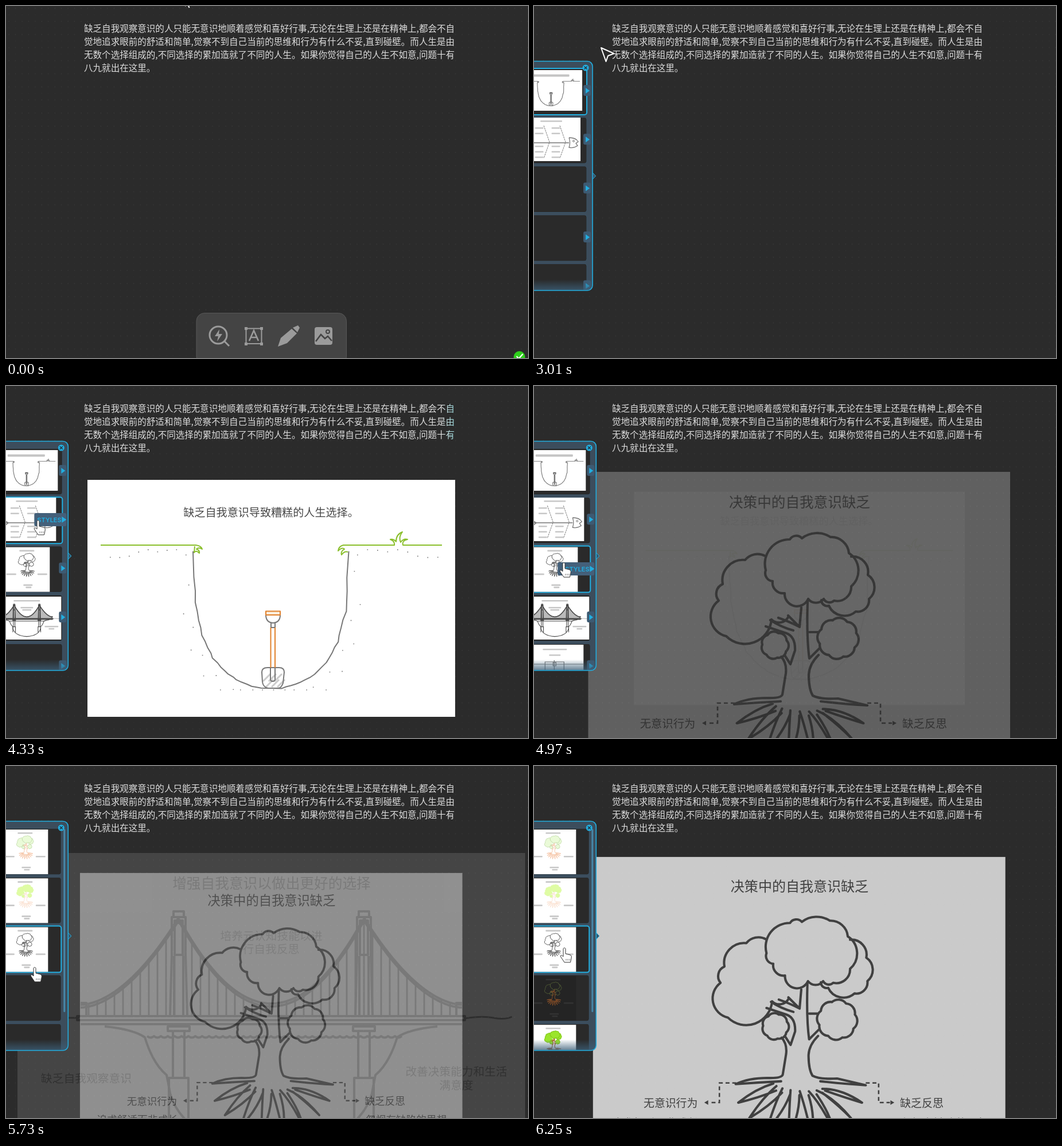
An HTML page for the animation above (6290 ms loop, 910x615 px).

```html
<!DOCTYPE html>
<html lang="zh">
<head>
<meta charset="utf-8">
<style>
html, body { margin: 0; width: 100%; height: 100%; overflow: hidden; background: #2b2b2b; }
svg { display: block; width: 100%; height: 100%; }
text { font-family: "Noto Sans CJK SC", "Noto Sans CJK", "Noto Sans", sans-serif; }
</style>
</head>
<body>
<svg id="stage" viewBox="0 0 910 615" fill="none"></svg>
<script>
const LOOP = 6290, INK = '#484848', BLUE = '#22aee0', SLATE = '#3d566a';
const stage = document.getElementById('stage');

// --- helpers ---
const range = (n, f) => Array.from({ length: n }, (_, i) => f(i));
const many = (n, f) => range(n, f).join('');
const rect = (x, y, w, h, fill, more = '') =>
  `<rect x="${x}" y="${y}" width="${w}" height="${h}" fill="${fill}" ${more}/>`;
const path = (d, more = '') => `<path d="${d}" ${more}/>`;
const label = (s, x, y, size, fill = INK, more = '') =>
  `<text x="${x}" y="${y}" font-size="${size}" fill="${fill}" text-anchor="middle" ${more}>${s}</text>`;
const group = (id, body, more = '') => `<g id="${id}" ${more}>${body}</g>`;
const place = (x, y, s, body) => `<g transform="translate(${x} ${y}) scale(${s})">${body}</g>`;
const bar = (cx, y, w, fill = '#c8c8c8', h = 2.6) => rect(cx - w / 2, y, w, h, fill, 'rx="1"');
const poly = pts => 'M' + pts.map(p => p.join(' ')).join('L');
const clamp = p => Math.min(1, Math.max(0, p));
const smooth = p => (p = clamp(p)) * p * (3 - 2 * p);
const easeOut = p => 1 - Math.pow(1 - clamp(p), 3);
function seeded(seed) {
  return () => (seed = seed * 16807 % 2147483647) / 2147483647;
}

// Scalloped outline through clockwise points; the third value is how far a lobe bulges
function cloud(pts, closed) {
  const all = closed ? [...pts, pts[0]] : pts;
  return all.map(([x, y, bulge = 0.25], i) => {
    if (!i) return `M${x} ${y}`;
    const r = Math.hypot(x - all[i - 1][0], y - all[i - 1][1]) * (bulge / 2 + 1 / (8 * bulge));
    return `A${r} ${r} 0 0 1 ${x} ${y}`;
  }).join('');
}
const blob = (cx, cy, r, n) => cloud(range(n, i => {
  const a = i / n * 2 * Math.PI + 0.5;
  return [cx + r * Math.cos(a), cy + r * Math.sin(a), 0.22];
}), true);

// --- pit ---
const pitPoint = (a, grow = 1) =>
  [462 - 134 * grow * Math.cos(a), 288 + 241 * grow * Math.pow(Math.sin(a), 0.606)];
function pitArt(w, green = '#8abf2c', orange = '#e0812c', ink = '#777') {
  const rnd = seeded(7);
  const wall = range(49, i => {
    const [x, y] = pitPoint(Math.PI * i / 48);
    return [x + rnd() * 4 - 2, y + rnd() * 2 - 1];
  });
  const dot = ([x, y]) => `M${x} ${y}h1.6`;
  const specks = many(25, i => dot(pitPoint(Math.PI * Math.pow((i + 0.7) / 25, 1), i % 2 ? 1.17 : 1.08).map((v, k) => k ? Math.min(v, 531) : v))) +
    many(9, i => {
      const y = 286 + rnd() * 15;
      return dot([181 + i * 16.5, y]) + dot([752 - i * 17.5, y]);
    });
  return `<g stroke-width="${w}" stroke-linejoin="round" stroke="${ink}">` +
    path(poly(wall)) + path(specks, 'stroke-width="1.6"') +
    path('M165 278H331Q340 279 342 285Q336 281 332 285Q338 287 337 292Q331 286 328 291L329 280' +
      'M760 278H692Q690 270 700 268Q693 266 688 273Q684 264 691 255Q680 259 680 272Q676 267 670 268Q678 271 677 278H588Q580 280 579 288Q586 281 590 285Q583 289 585 295Q590 288 596 290',
      `stroke="${green}"`) +
    path('M453 400Q453 413 465.5 414Q478 413 478 400M462 414V422H469V414M456 492H476Q485 492 485 500L483 519Q480 528 474 528H457Q448 526 447 517L446 500Q446 492 456 492M461 492V512Q461 516 465 516Q469 516 469 512V492') +
    path('M453 393.5H478V400H453ZM461.5 422V492M469 422V492', `stroke="${orange}" fill="#fbeedd"`) + '</g>';
}

// --- tree ---
const leftCrown = cloud([[443, 404], [414, 408], [335, 437, 0.32], [322, 375, 0.32], [329, 346], [368, 304], [403, 297, 0.18]]);
const rightCrown = cloud([[553, 298], [582, 330], [584, 372], [561, 394], [514, 384], [501, 374]]);
const midCrown = cloud([[404, 322], [446, 268], [467, 266], [517, 264, 0.16], [549, 292, 0.2], [553, 350], [523, 375],
  [505, 372], [478, 372], [437, 362, 0.42], [416, 341]], true);
const trunk = 'M477 376Q475 440 480 476L497 459M480 430H495M466 387L463 421L443 401M426 405Q446 412 463 421' +
  'M412 409Q430 421 452 427M404 420L440 432Q456 438 455 462L447 486L438 472' +
  'M431 473Q441 484 439 502L433 539Q431 546 405 545Q372 545 349 556Q390 553 430 551' +
  'M496 470Q480 486 479 504Q479 530 486 541Q500 548 530 546L581 558Q545 556 500 551';
// Tapered roots fanned below the trunk
const roots = many(8, i => {
  const a = Math.PI * (0.1 + 0.8 * i / 7), c = Math.cos(a), s = Math.sin(a);
  const bx = 462 + 46 * c, by = 556 + 12 * s, tx = 464 + 116 * c, ty = 562 + 88 * s;
  const mx = (bx + tx) / 2, my = (by + ty) / 2;
  return `M${bx - 7 * s} ${by + 5 * c}Q${mx - 4 * s} ${my - 10} ${tx} ${ty}Q${mx + 14 * s} ${my + 6} ${bx + 9 * s} ${by + 8}`;
});
function treeArt(w, leaf = INK, wood = INK, fill = 'none') {
  const leaves = [leftCrown, rightCrown, midCrown, blob(420, 453, 22, 7), blob(530, 441, 33, 8)];
  return `<g stroke-width="${w}" stroke-linejoin="round" stroke-linecap="round">` +
    path(trunk + roots, `stroke="${wood}"`) +
    `<g stroke="${leaf}">${leaves.map(d => path(d, `fill="${fill}"`)).join('')}</g></g>`;
}

// --- bridge ---
function cableY(x) {
  const d = Math.abs(x - 462.5);
  return d > 161.5 ? 417 - 152 * Math.pow((332.5 - d) / 171, 1.8) : 415 - 150 * Math.pow(d / 161.5, 2);
}
function bridgeArt(w) {
  const cable = range(134, i => [130 + i * 5, cableY(130 + i * 5)]);
  const hangers = many(43, i => `M${144 + i * 15} ${cableY(144 + i * 15)}V437`);
  const side = (x, k) => `M${x} 254H${x + 9 * k}V264H${x + 12 * k}V330L${x + 15 * k} 437M${x} 270H${x + 7 * k}V330H${x}M${x} 264H${x + 12 * k}` +
    `M${x + 8 * k} 332V437M${x} 455H${x + 19 * k}V463H${x}M${x + 10 * k} 463V545M${x} 545H${x + 17 * k}V616`;
  const bank = (cx, k) => {
    const p = (x, y) => `${cx - k * x} ${y} `;
    return `M${p(290, 455)}Q${p(240, 460)}${p(220, 474)}Q${p(206, 520)}${p(182, 540)}Q${p(178, 560)}${p(176, 572)}Q${p(150, 660)}${p(0, 670)}`;
  };
  return `<g stroke="${INK}" stroke-linejoin="round" stroke-width="${w}">` +
    path(poly(cable)) + path(poly(cable.map(([x, y]) => [x, y + 5]))) + path(hangers, `stroke-width="${w * 0.7}"`) +
    [301, 624].map(x => path(side(x, 1) + side(x, -1))).join('') +
    path('M124 437H800V444H124ZM130 451H795M130 414H140V437M795 414H785V437') +
    path('M246 472' + 'q6 5 12 0'.repeat(37) + bank(462, 1) + bank(462, -1)) +
    path('M105 440H128M800 441Q830 436 850 440T882 438', 'stroke-width="3"') + '</g>';
}

// --- sheets ---
const PEN = 'font-weight="500"';
const hatch = many(6, i => `M${448 + i * 5} ${516 + i % 2 * 10}l13 -13`);
const pit = rect(142, 164, 641, 414, '#fff') + label('缺乏自我意识导致糟糕的人生选择。', 462, 228, 19.1) +
  group('hatch', path(hatch, 'stroke="#ccc" stroke-width="3"')) + pitArt(2);
const tree = rect(94.5, 150, 735.5, 790, '#fff') +
  label('决策中的自我意识缺乏', 463, 212, 24.6, INK, PEN) + treeArt(4.2) +
  path('M350 554H320V589H302M581 554H604V589H624', `stroke="${INK}" stroke-width="2.6" stroke-dasharray="7 5"`) +
  path('M293 589l7-4v8zM632 589l-7-4v8z', `fill="${INK}"`) +
  label('无意识行为', 233, 597, 19.3, INK, PEN) + label('缺乏反思', 681, 597, 19.5, INK, PEN) +
  label('追求舒适而非成长', 205, 633, 19.5) + label('忽视有缺陷的思想', 722, 633, 19.5);
const bridge = rect(20, 152, 885, 560, '#fff') + label('增强自我意识以做出更好的选择', 463, 214, 24.7, '#555', PEN) +
  label('培养元认知技能以进', 462.5, 304, 19.8, '#777') + label('行自我反思', 462, 327, 19.8, '#777') +
  label('缺乏自我观察意识', 140, 553, 19.8, '#555') + label('改善决策能力和生活', 785, 541, 19.7, '#555') +
  label('满意度', 785, 565, 19.7, '#555') + bridgeArt(4);

// --- side panel ---
const slotTop = i => 109 + i * 85.3;
const slots = w => many(5, i => rect(-8, slotTop(i), w + 8, 81, '#2a2a2a', `id="${w}s${i}" rx="4" stroke="${SLATE}"`));
const tabs = many(5, i => rect(93, slotTop(i) + 29, 13, 19, '#3d5a72', 'rx="3"') + path(`M97 ${slotTop(i) + 34}l7 5l-7 5z`, `fill="${BLUE}"`));
function treeThumb(i, w, art, paper = '#fff', ink = '#c8c8c8') {
  const y = slotTop(i), cx = w - 40;
  return rect(0, y + 2, w, 78, paper) + place(cx - 47, y - 14, 0.104, art) + bar(cx, y + 7, 26, ink) +
    [-1, 1].map(k => bar(cx + 27 * k, y + 48, 17, ink)).join('') + bar(cx + 2, y + 67, 16, ink) + bar(cx + 3, y + 71, 10, ink);
}
const fishThumb = rect(0, 195, 88, 76, '#fff') +
  path('M0 239H68M0 236L5 239L0 243M68 230Q80 230 84 237L80 240L83 244Q76 249 68 247Q71 239 68 230', 'stroke="#777" stroke-width="1.3"') +
  '<circle cx="76" cy="236" r="1.5" stroke="#777"/>' + bar(37, 200, 38) +
  many(2, i => path(`M${24 + i * 28} 209l10 29l-10 28`, 'stroke="#777" stroke-dasharray="3 1"') +
    many(5, j => bar(16 + i * 29, 212 + j * 9.5 + (j > 1 ? 13 : 0), 15)));
const cardThumb = rect(0, 452, 87, 60, '#fff') + bar(37, 459, 42) + bar(37, 469, 20) +
  path('M0 486H87M20 497V482H53V497M36 479V500M34 483H39V489H34Z', 'stroke="#777" stroke-width="1.2"');
const ideas = slots(99) +
  rect(0, 112, 91, 71, '#fff') + place(-43, 84, 0.171, pitArt(6.5, '#888', '#666', '#777')) + bar(36, 119.5, 65, '#c4c4c4', 4) +
  fishThumb +
  group('late', treeThumb(2, 77, treeArt(9, '#555', '#555')) +
    rect(0, 368, 97, 75, '#fff') + place(-26, 346.5, 0.136, bridgeArt(8)) +
    bar(37, 374, 46) + bar(37, 386, 22) + bar(37, 390, 16) + bar(80, 419, 24) + bar(80, 423, 10)) +
  group('card', cardThumb) + tabs;
const styles = slots(97) +
  treeThumb(0, 74, treeArt(7, '#b9d6a0', '#f3b48c', '#eafad8')) +
  treeThumb(1, 74, treeArt(5, '#dcf8a4', '#f7cdb2', '#dffca4')) +
  treeThumb(2, 74, treeArt(9, '#555', '#555')) +
  group('more', treeThumb(3, 74, treeArt(7, '#5d6b3a', '#a05a28'), '#242424', '#333') +
    treeThumb(4, 74, treeArt(12, '#86cc1e', '#b36a34', '#9be52c'))) +
  rect(101, 110, 3, 320, '#4787a8', 'rx="1.5"');
const tag = (id, x, y) => group(id, rect(x, y, 106 - x, 23, '#44607a', 'rx="3"') +
  `<text x="55" y="${y + 15.5}" font-size="11" font-weight="600" fill="${BLUE}" style="font-family:Inter,sans-serif" textLength="auto">STYLES</text>` +
  path(`M98 ${y + 6}l8 5.5l-8 5.5z`, `fill="${BLUE}"`));
const panel = path('M108 290L114.5 297L108 304', `fill="#3a5468" stroke="${BLUE}"`) +
  rect(-20, 96.5, 129, 400.5, '#3c4d5c', `rx="9" stroke="${BLUE}" stroke-width="1.6"`) +
  `<g clip-path="url(#frame)">${group('ideas', ideas)}${group('styles', styles)}${rect(0, 478, 108, 19, 'url(#foot)')}</g>` +
  tag('tag1', 50, 222) + tag('tag2', 42, 308) +
  `<circle cx="97" cy="108" r="5.5" fill="${BLUE}"/>` + path('M94.5 105.5l5 5m0-5l-5 5', 'stroke="#24303a" stroke-width="1.4"');

// --- page ---
const lines = ['缺乏自我观察意识的人只能无意识地顺着感觉和喜好行事,无论在生理上还是在精神上,都会不自',
  '觉地追求眼前的舒适和简单,觉察不到自己当前的思维和行为有什么不妥,直到碰壁。而人生是由',
  '无数个选择组成的,不同选择的累加造就了不同的人生。如果你觉得自己的人生不如意,问题十有', '八九就出在这里。'];
const words = lines.map((s, i) => `<text x="136" y="${45 + i * 22.9}" font-size="15.55" fill="url(#glint)">${s}</text>`).join('');
const rows = many(27, i => `M0 ${3.8 + i * 22.9}H910`);
const toolbar = rect(332, 536.5, 261.5, 90, '#444', 'rx="14" stroke="#585858"') +
  '<g stroke="#9b9b9b" stroke-width="3"><circle cx="370" cy="575" r="15"/>' + path('M381 586L389 594') +
  path('M418.5 563.5H445.5V590H418.5Z', 'stroke-width="2"') + path('M424 585L432 567L440 585M427 579H437', 'stroke-width="2.6"') + '</g><g fill="#9b9b9b">' +
  path('M372 565L364 577H370L368 586L377 573H371Z') +
  path('M416 561h5v5h-5zM443 561h5v5h-5zM416 588h5v5h-5zM443 588h5v5h-5z') +
  path('M474 595L479 580L498 564L507 572L490 589ZM500 562L509 558L512 562L508 570Z') +
  rect(538, 561, 31, 31, '#9b9b9b', 'rx="4"') + '</g>' +
  path('M540 586L549 574L556 581L561 577L568 585', 'stroke="#444" stroke-width="2.5"') + '<circle cx="561" cy="569" r="3" stroke="#444" stroke-width="2"/>';

const wave = (id, stops) => `<radialGradient id="${id}G" gradientUnits="userSpaceOnUse" cx="118" cy="85" r="1">` +
  stops.map(([o, c]) => `<stop offset="${o}" stop-color="${c}"/>`).join('') +
  `</radialGradient><mask id="${id}" maskUnits="userSpaceOnUse" x="0" y="0" width="910" height="615">${rect(0, 0, 910, 615, `url(#${id}G)`)}</mask>`;

stage.innerHTML = '<defs>' +
  wave('inner', [[0, '#666'], [0.7, '#fff'], [0.82, '#000']]) +
  wave('rim', [[0.7, '#000'], [0.8, '#fff'], [0.92, '#fff'], [1, '#000']]) +
  wave('outer', [[0.7, '#000'], [0.82, '#fff']]) +
  `<pattern id="dots" width="11.45" height="22.9" patternUnits="userSpaceOnUse">${rect(4.5, 3.3, 1.2, 1.2, '#404040')}${rect(4.5, 14.7, 1.2, 1.2, '#343434')}</pattern>` +
  '<linearGradient id="glint" gradientUnits="userSpaceOnUse" x1="0" x2="150" y1="0" y2="0"><stop stop-color="#dcdcdc"/><stop offset=".35" stop-color="#38d3da"/><stop offset=".65" stop-color="#2ccfd8"/><stop offset="1" stop-color="#dcdcdc"/></linearGradient>' +
  '<linearGradient id="sheen"><stop stop-color="#1d6468" stop-opacity="0"/><stop offset="1" stop-color="#1d6468" stop-opacity=".4"/></linearGradient>' +
  '<linearGradient id="foot" x2="0" y2="1"><stop stop-color="#3c5f78" stop-opacity="0"/><stop offset="1" stop-color="#3c5f78" stop-opacity=".8"/></linearGradient>' +
  `<clipPath id="frame">${rect(-20, 97.5, 128, 398.5, '#fff', 'rx="8"')}</clipPath><clipPath id="para">${rect(136, 27, 646, 92, '#fff')}</clipPath></defs>` +
  rect(0, 0, 910, 615, '#2b2b2b') + rect(0, 0, 910, 615, 'url(#dots)', 'mask="url(#outer)"') +
  group('rules', `<g mask="url(#inner)">${path(rows, 'stroke="#3b3b3b"')}</g><g mask="url(#rim)">${path(rows, 'stroke="#404040" stroke-dasharray="7 4.45"')}${path('M131 400V510', 'stroke="#4a2c2c"')}</g>`) +
  `<g clip-path="url(#para)">${rect(0, 27, 85, 92, 'url(#sheen)', 'id="shine"')}</g>` + words +
  rect(127, 27, 4, 91, '#1c5568', 'id="bar"') + rect(136.5, 30, 1.4, 18, '#ddd', 'id="caret"') +
  group('toolbar', toolbar) +
  group('check', '<circle cx="895" cy="613" r="10" fill="#2fcf1c"/>' + path('M890 612L894 616L901 608', 'stroke="#fff" stroke-width="2.2"')) +
  group('pit', pit) + group('tree', tree) + group('bridge', bridge) + group('panel', panel) +
  group('arrow', path('M0 0L0 17L4 13.5L6.5 19L9 18L6.5 12.5H12Z', 'fill="#fff" stroke="#222" stroke-width=".8"')) +
  group('pointer', path('M0 0L22.5 10L12 14L8.5 24Z', 'fill="#2b2b2b" stroke="#fff" stroke-width="2" stroke-linejoin="round"')) +
  group('hand', path('M-2 1.5C-2-.7 2-.7 2 1.5V10L10 12C12.5 13 12.5 15 12 18L10.5 25H0L-6 16C-8 13-6 11-2 15Z', 'fill="#fff" stroke="#333"') +
    path('M3 19V22M6 19V22M9 19V22', 'stroke="#777"'));

// --- motion ---
const el = {};
stage.querySelectorAll('[id]').forEach(n => el[n.id] = n);
const show = (id, on) => el[id].style.display = on ? '' : 'none';
const set = (id, name, v) => el[id].setAttribute(name, v);
const ramp = (t, start, length) => clamp((t - start) / length);

// Mouse moves: start, end, x, y
const MOVES = [[290, 1130, 117, 73], [3530, 3970, 56, 235], [4690, 4850, 52, 309], [5010, 5410, 50, 352], [5930, 6250, 53, 318]];
function mouse(t) {
  return MOVES.reduce(([x, y], [from, to, nx, ny]) => {
    const p = smooth(ramp(t, from, to - from));
    return [x + (nx - x) * p, y + (ny - y) * p];
  }, [312, -15]);
}

// Each sheet fades in and out over the same time; some also zoom from or to 90 %
const FADE = 200;
const VISITS = [
  { id: 'pit', cy: 371, from: 3364, to: 4776, zoomOut: true },
  { id: 'tree', cy: 544, from: 4920, to: 5250 },
  { id: 'bridge', cy: 432, from: 5250, to: 5554 },
  { id: 'tree', cy: 544, from: 5650, to: 6200, zoomIn: true, zoomOut: true }
];
function drawSheets(t) {
  for (const id of ['pit', 'tree', 'bridge']) show(id, false);
  for (const { id, cy, from, to, zoomIn, zoomOut } of VISITS) {
    if (t <= from || t >= to + FADE) continue;
    const a = Math.min(ramp(t, from, FADE), 1 - ramp(t, to, FADE));
    const zooms = t < to ? zoomIn : zoomOut;
    const s = zooms ? 0.9 + 0.1 * smooth((a - 0.3) / 0.65) : 1;
    show(id, true);
    set(id, 'opacity', a);
    set(id, 'transform', `translate(${462.5 * (1 - s)} ${cy * (1 - s)}) scale(${s})`);
  }
}

function drawPanel(t) {
  const inStyles = t >= 5410;
  const hover = inStyles ? 2 : [4010, 4770, 5250].filter(at => t >= at).length;
  set('panel', 'transform', `translate(${-122 * (1 - easeOut(ramp(t, 2690, 520))) - (t >= 4010 ? 0.7 : 0)} 0)`);
  show('panel', t >= 2690);
  show('ideas', !inStyles);
  show('styles', inStyles);
  show('late', t >= 4090);
  show('card', t >= 4650);
  show('more', t >= 6010);
  show('tag1', hover === 1);
  show('tag2', hover === 2 && !inStyles);
  for (const w of [99, 97]) for (let i = 0; i < 5; i++) {
    set(`${w}s${i}`, 'stroke', i === hover ? BLUE : SLATE);
    set(`${w}s${i}`, 'stroke-width', i === hover ? 2 : 1);
  }
}

function draw(t) {
  const rippling = t >= 1370 && t < 2770;
  for (const id of ['inner', 'rim', 'outer']) set(id + 'G', 'r', rippling ? 1 + 431 * ramp(t, 1370, 600) : 1);
  show('rules', rippling);

  const gx = 240 + (t - 3450) * 0.676, shining = t > 3200 && t < 4450;
  set('glint', 'gradientTransform', `translate(${shining ? gx - 75 : -400} 0)`);
  set('shine', 'x', gx - 40);
  show('shine', shining);

  show('bar', t >= 730 && t < 2690);
  show('caret', t >= 1450 && t < 2410);
  set('check', 'opacity', 1 - ramp(t, 1370, 840));
  set('toolbar', 'transform', `translate(0 ${90 * easeOut(ramp(t, 2690, 400))})`);
  drawSheets(t);
  drawPanel(t);

  const [x, y] = mouse(t);
  const kind = t < 890 ? 'arrow' : t < 2170 || t >= 3850 ? 'hand' : 'pointer';
  for (const id of ['arrow', 'pointer', 'hand']) {
    show(id, id === kind);
    set(id, 'transform', `translate(${x} ${y})`);
  }
}

const start = performance.now();
function tick() {
  const t = (performance.now() - start) % LOOP;
  draw(Math.max(0, 10 + 40 * Math.floor((t - 10) / 40)));
  requestAnimationFrame(tick);
}
tick();
</script>
</body>
</html>
```
